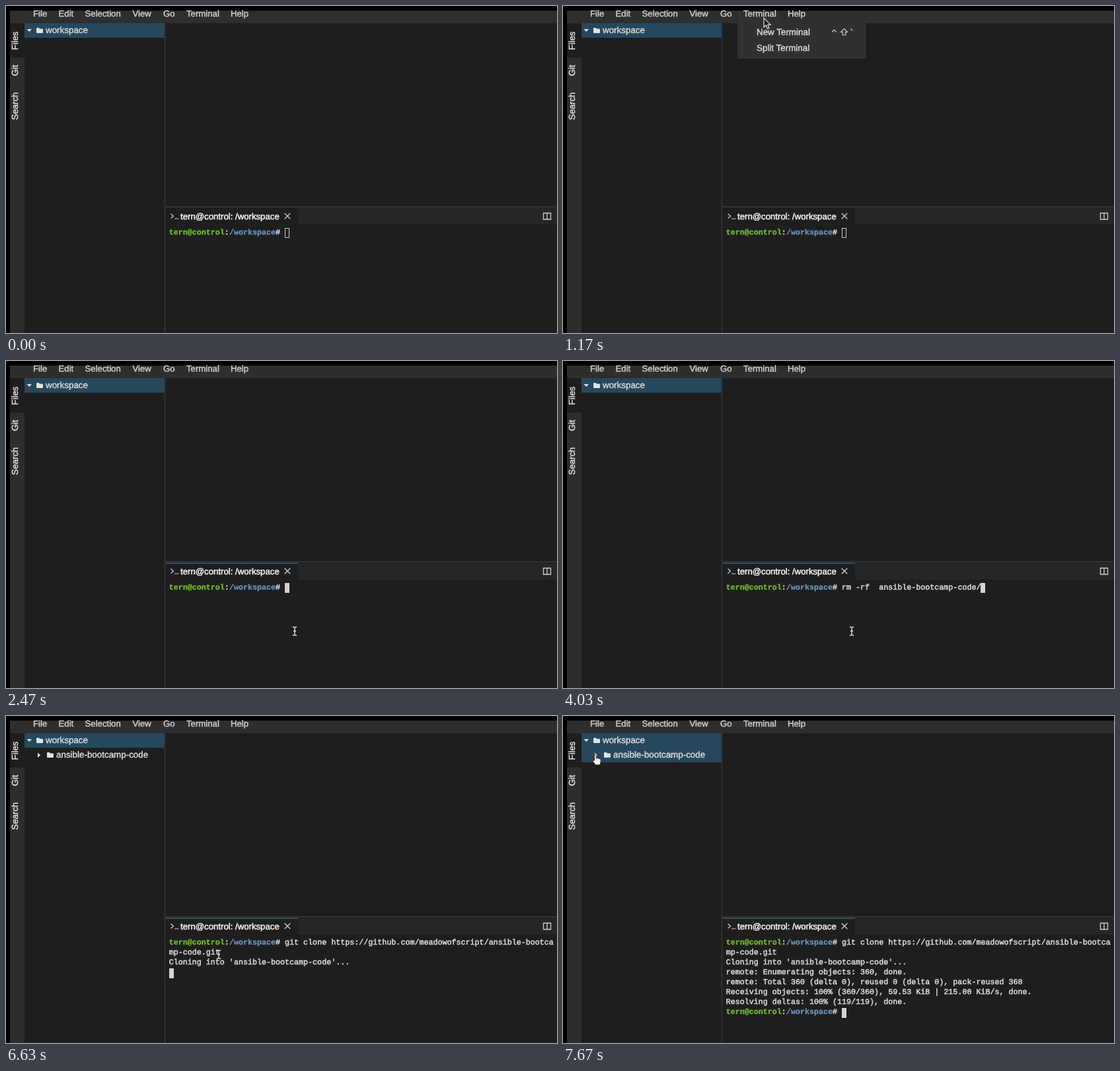
An HTML page that plays this animation: 834 by 495 pixels, repeating every 8 s.

```html
<!DOCTYPE html>
<html lang="en">
<head>
<meta charset="utf-8">
<title>Workspace terminal</title>
<style>
  html, body { margin: 0; width: 834px; height: 495px; overflow: hidden; background: #000; }
  svg { position: absolute; left: 0; top: 0; display: block; }
  text {
    font: 13.4px "Liberation Sans", Arial, sans-serif;
    fill: #dcdcdc; stroke: #dcdcdc; stroke-width: .4px;
    text-rendering: geometricPrecision;
  }
  #bar text { font-size: 13.2px; fill: #d2d2d2; stroke: #d2d2d2; }
  #side text { font-size: 13.2px; stroke-width: .5px; }
  .title { font-size: 13.2px; fill: #eee; stroke: #eee; stroke-width: .55px; }
  pre {
    position: absolute; left: 246.7px; top: 335.9px; margin: 0;
    font: 11.7px/15.05px "Liberation Mono", "Courier New", monospace;
    color: #dcdcdc; -webkit-text-stroke: .5px currentColor;
    text-rendering: geometricPrecision;
  }
  pre b { color: #74bd2c; -webkit-text-stroke-width: .3px; }
  pre .path { color: #6c92b8; }
  #caret {
    display: inline-block; box-sizing: border-box; vertical-align: top;
    position: relative; top: .6px;
    width: 7px; height: 15px; border: 1px solid #c8c8c8;
  }
  .focus #caret { background: #d4d4d4; border-color: #d4d4d4; }
</style>
</head>
<body>
<svg width="834" height="495" viewBox="0 0 834 495">
  <defs>
    <path id="folder" d="M0 1.2Q0 0 1.2 0H3.6L5 1.5H9Q10 1.5 10 2.5V7Q10 8 9 8H1Q0 8 0 7Z" fill="#e2e2e2"/>
  </defs>

  <rect x="6" y="7" width="828" height="488" fill="#1f1e1f"/>
  <rect x="6" y="7" width="828" height="19" fill="#2e2e2e"/>
  <rect id="hot" x="265" y="7" width="65" height="19"/>
  <g id="bar"></g>

  <rect x="6" y="78" width="22" height="417" fill="#2d2d2d"/>
  <g id="side"></g>

  <rect x="28" y="26" width="212" height="22" fill="#26485d"/>
  <path d="M31.5 35h7.5l-3.75 4z" fill="#e2e2e2"/>
  <use href="#folder" x="46" y="33"/>
  <text x="60" y="41">workspace</text>
  <g id="child">
    <rect id="picked" x="28" y="48" width="212" height="22" fill="#26485d"/>
    <path d="M48 55.5v7.5l4-3.75z" fill="#e2e2e2"/>
    <use href="#folder" x="62" y="55"/>
    <text x="76" y="63">ansible-bootcamp-code</text>
  </g>

  <rect x="239.5" y="26" width="2" height="469" fill="#303030"/>
  <rect x="241" y="303" width="593" height="2" fill="#343434"/>
  <rect x="442" y="306" width="392" height="25" fill="#262627"/>
  <rect id="line" x="242" y="305.5" width="200" height="1.5" fill="#2b617f"/>
  <path d="M249.5 314.5l4 3.5-4 3.5M255 322h6.5" fill="none" stroke="#d0d0d0" stroke-width="1.2"/>
  <text class="title" x="264" y="322.5">tern@control: /workspace</text>
  <path d="M421.7 313.7l8.6 8.6m0-8.6l-8.6 8.6" stroke="#d0d0d0" stroke-width="1.3"/>
  <path d="M813.5 313.5h11v9.5h-11zM819 313v10" fill="none" stroke="#cfcfcf" stroke-width="1.3"/>

  <g id="menu">
    <rect x="263" y="27" width="198" height="55" fill="#171717" opacity=".6"/>
    <rect x="264" y="26" width="195" height="54" fill="#303031"/>
    <text x="293" y="44">New Terminal</text>
    <text x="293" y="68">Split Terminal</text>
    <path d="M407 39.5l3.3-3.5 3.3 3.5M425.5 34.5l5 5h-2.7v4.5h-4.6v-4.5h-2.7zM435.5 34.5l2.5 2.5" fill="none" stroke="#d0d0d0" stroke-width="1.2"/>
  </g>
</svg>

<pre id="term"><span id="out"></span><span id="caret"></span></pre>

<svg width="834" height="495" viewBox="0 0 834 495">
  <g id="mouse">
    <path id="arrow" d="M0 0V14L3.2 11.2 5.5 16.5 8 15.4 5.8 10.3H10Z" fill="#1c1c1c" stroke="#d4d4d4" stroke-width="1.3"/>
    <path id="beam" d="M-3.2-6.5Q0-6.5 0-4.5Q0-6.5 3.2-6.5M0-4.5V4.5M-2-.2H2M-3.2 6.5Q0 6.5 0 4.5Q0 6.5 3.2 6.5" fill="none" stroke="#dedede" stroke-width="1.4"/>
    <path id="hand" d="M0 1.3Q1.4-.8 2.7 1.3V6Q4.2 4.8 5.2 6.4Q6.8 5.4 7.6 7Q9.3 6.3 9.6 8.4V11.5L8.4 16H1.8L-2.4 10.6Q-2.4 8.4 0 9.6Z" fill="#f2f2f2" stroke="#222" stroke-width=".8"/>
  </g>
</svg>

<script>
const LOOP = 8000, STEP = 130;
const $ = id => document.getElementById(id);
const show = (id, on) => { $(id).style.display = on ? '' : 'none'; };
const within = (t, a, b) => t >= a && t < b;

$('bar').innerHTML = [['File', 41], ['Edit', 79.5], ['Selection', 119.5], ['View', 191.5],
  ['Go', 238], ['Terminal', 273], ['Help', 340]]
  .map(([s, x]) => `<text x="${x}" y="16">${s}</text>`).join('');
$('side').innerHTML = [['Files', 52.5], ['Git', 97.5], ['Search', 151.5]]
  .map(([s, y]) => `<text text-anchor="middle" transform="translate(18 ${y}) rotate(-90)">${s}</text>`).join('');

const prompt = '<b>tern@control</b>:<b class="path">/workspace</b># ';
const clone = prompt + 'git clone https://github.com/meadowofscript/ansible-bootca\nmp-code.git';
const cloning = clone + "\nCloning into 'ansible-bootcamp-code'...\n";
const counted = cloning + 'remote: Enumerating objects: 360, done.\n';
const received = counted
  + 'remote: Total 360 (delta 0), reused 0 (delta 0), pack-reused 360\n'
  + 'Receiving objects: 100% (360/360), 59.53 KiB | 215.00 KiB/s, done.\n'
  + 'Resolving deltas: 100% (119/119), done.\n';
const screens = [[0, prompt], [4030, prompt + 'rm -rf  ansible-bootcamp-code/'],
  [4550, prompt], [4680, clone], [5200, cloning], [6890, counted], [7150, received + prompt]];

// Pointer paths: time, x, y
const paths = [
  [[260, 560, 280], [910, 309, 24], [1170, 304, 18], [1430, 306, 20], [1560, 310, 26],
   [1820, 310, 26], [1950, 372, 184], [2080, 398, 250], [2340, 437, 409], [4550, 437, 409]],
  [[6630, 322, 361], [7280, 52, 68], [7410, 47.5, 58], [8000, 47.5, 58]]
];

function pointer(t) {
  const path = paths.find(p => within(t, p[0][0], p[p.length - 1][0]));
  if (!path) return null;
  const i = path.findIndex(k => k[0] > t);
  const [a, b] = [path[i - 1], path[i]];
  const f = (t - a[0]) / (b[0] - a[0]);
  return [a[1] + (b[1] - a[1]) * f, a[2] + (b[2] - a[2]) * f];
}

let shown;
function draw(now) {
  const t = Math.floor(now % LOOP / STEP + 1e-6) * STEP;
  const open = within(t, 1170, 2340);
  const focus = t >= 2470;

  show('hot', within(t, 780, 2340));
  $('hot').setAttribute('fill', open ? '#303031' : '#272727');
  show('menu', open);
  show('line', focus);
  show('child', t >= 5330);
  show('picked', t >= 7670);
  $('term').className = focus ? 'focus' : '';

  const text = screens.filter(s => s[0] <= t).pop()[1];
  if (text !== shown) $('out').innerHTML = shown = text;

  const p = pointer(t);
  show('mouse', p);
  if (p) {
    const kind = t >= 7410 ? 'hand' : p[0] > 241 && p[1] > 331 ? 'beam' : 'arrow';
    ['arrow', 'beam', 'hand'].forEach(k => show(k, k === kind));
    $('mouse').setAttribute('transform', `translate(${p[0]} ${p[1]})`);
  }
}

const start = performance.now();
(function tick() {
  draw(performance.now() - start);
  requestAnimationFrame(tick);
})();
</script>
</body>
</html>
```
